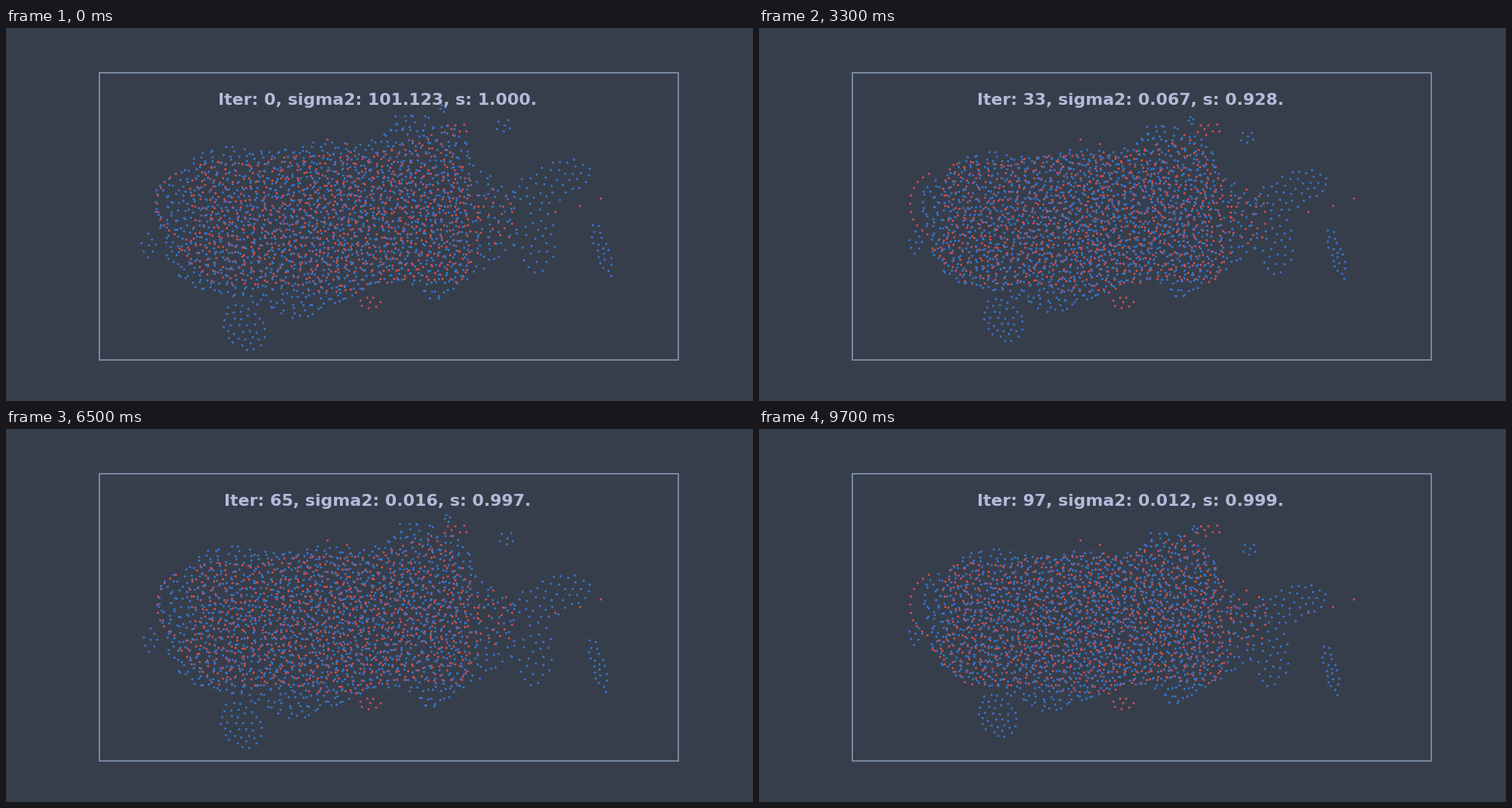
Write a matplotlib script that moves like this. It is 1000 px wide and 500 px high and loops after 9.8 s.

```python
import numpy as np
import matplotlib.pyplot as plt
from matplotlib.animation import FuncAnimation
from matplotlib.patches import Rectangle
from matplotlib.path import Path

WIDTH, HEIGHT, DPI = 1000, 500, 100
FRAMES, INTERVAL = 98, 100
BACKGROUND, EDGE, TEXT = "#373e4b", "#8aa0bc", "#b2bcd9"
BLUE, RED = "#3572c6", "#c44e52"

rng = np.random.default_rng(7)

# Dense part of each cloud
BLUE_BODY = [
    (198, 212), (240, 188), (250, 170), (300, 157), (360, 167), (415, 150),
    (478, 155), (508, 140), (520, 117), (552, 114), (600, 135), (618, 155),
    (624, 182), (680, 215), (684, 290), (608, 345), (572, 367), (535, 338),
    (500, 342), (392, 392), (300, 360), (243, 345), (218, 318), (198, 245)]
RED_BODY = [
    (242, 214), (260, 180), (395, 170), (458, 164), (478, 171), (570, 142),
    (612, 182), (632, 225), (632, 300), (608, 342), (540, 335), (470, 354),
    (410, 356), (385, 344), (270, 342), (232, 295), (254, 262)]


def ellipse(cx, cy, rx, ry, tilt=0, start=0, stop=360, count=40):
    t = np.radians(np.linspace(start, stop, count))
    x, y = rx * np.cos(t), ry * np.sin(t)
    a = np.radians(tilt)
    return np.column_stack([cx + x * np.cos(a) - y * np.sin(a),
                            cy + x * np.sin(a) + y * np.cos(a)])


def crowding(point):
    """Relative spacing: tight in the middle, loose towards the right end."""
    x, y = point
    r2 = ((x - 450) / 260) ** 2 + ((y - 255) / 110) ** 2
    return (0.87 + 0.2 * r2) * (1.4 if x > 620 else 1)


def scatter(outline, spacing, layers=1, relative=lambda point: 1, tries=4500):
    """Random points inside the outline, kept apart within each layer."""
    low, high = np.min(outline, axis=0), np.max(outline, axis=0)
    points = []
    for _ in range(layers):
        kept = np.empty((0, 2))
        candidates = rng.uniform(low, high, (tries, 2))
        for point in candidates[Path(outline).contains_points(candidates)]:
            gap = spacing * relative(point)
            if np.all(((kept - point) ** 2).sum(axis=1) > gap ** 2):
                kept = np.vstack([kept, point])
        points.append(kept)
    return np.vstack(points)


# Two layers in each body: front and back of a surface
blue_points = np.vstack([
    scatter(BLUE_BODY, 8.1, 2, crowding),
    scatter(ellipse(319, 402, 37, 25, 45), 8),
    scatter(ellipse(732, 206, 54, 26, -20), 9),
    scatter(ellipse(712, 285, 23, 45), 10),
    scatter(ellipse(798, 297, 38, 9, 72), 7),
    scatter(ellipse(665, 131, 10, 12), 8),
    scatter(ellipse(190, 289, 10, 18), 9),
    scatter(ellipse(584, 108, 5, 5), 5),
])
red_points = np.vstack([
    scatter(RED_BODY, 9.7, 2, crowding),
    scatter(ellipse(656, 252, 27, 38), 11),
    scatter(ellipse(602, 135, 18, 8), 7),
    scatter(ellipse(489, 368, 17, 8), 7),
    ellipse(236, 236, 34, 42, 0, 108, 255, 11),
    [(430, 149), (456, 155), (735, 246), (768, 238), (796, 228)],
])

# Key values of the fit: iteration, scale, variance
KEY_ITER = [1, 18, 33, 41, 54, 74, 97]
KEY_SCALE = np.array([.015, .45, .928, .975, .992, .999, .999])
KEY_VARIANCE = np.array([32, .583, .067, .034, .020, .013, .012])
PIVOT = np.array([431, 258])


def sigmoid(x):
    return 1 / (1 + np.exp(-x))


def fit_state(i):
    if i == 0:
        return 1.0, 101.123
    logit = np.interp(i, KEY_ITER, np.log(KEY_SCALE / (1 - KEY_SCALE)))
    return sigmoid(logit), np.exp(np.interp(i, KEY_ITER, np.log(KEY_VARIANCE)))


def moved_points(i, scale):
    if i == 0:
        return blue_points
    # Slow rotation, a late turn in depth that shortens the view, and a drift
    angle = np.radians(1.05 + 0.0525 * max(i - 33, 0))
    size = scale * (1 - 0.08 * sigmoid((i - 73.5) / 4))
    center = np.array([432, 261]) + (1 - scale) * np.array([17, -10])
    cos, sin = np.cos(angle), np.sin(angle)
    return center + size * (blue_points - PIVOT) @ np.array([[cos, sin], [-sin, cos]])


fig = plt.figure(figsize=(WIDTH / DPI, HEIGHT / DPI), dpi=DPI, facecolor=BACKGROUND)
ax = fig.add_axes([0, 0, 1, 1])
ax.set(xlim=(0, WIDTH), ylim=(HEIGHT, 0))
ax.axis("off")
ax.add_patch(Rectangle((125, 60), 775, 385, fill=False, ec=EDGE, lw=1.1))
ax.scatter(*red_points.T, s=5, c=RED, lw=0, zorder=2)
blue = ax.scatter(*blue_points.T, s=5, c=BLUE, lw=0, zorder=3)
title = ax.text(497, 103, "", color=TEXT, fontsize=16, fontweight="bold",
                family="DejaVu Sans", ha="center", va="baseline", zorder=4)


def update(i):
    scale, variance = fit_state(i)
    blue.set_offsets(moved_points(i, scale))
    title.set_text(f"Iter: {i}, sigma2: {variance:.3f}, s: {scale:.3f}.")
    return blue, title


animation = FuncAnimation(fig, update, frames=FRAMES, interval=INTERVAL,
                          repeat=True, repeat_delay=0)
plt.show()
```
